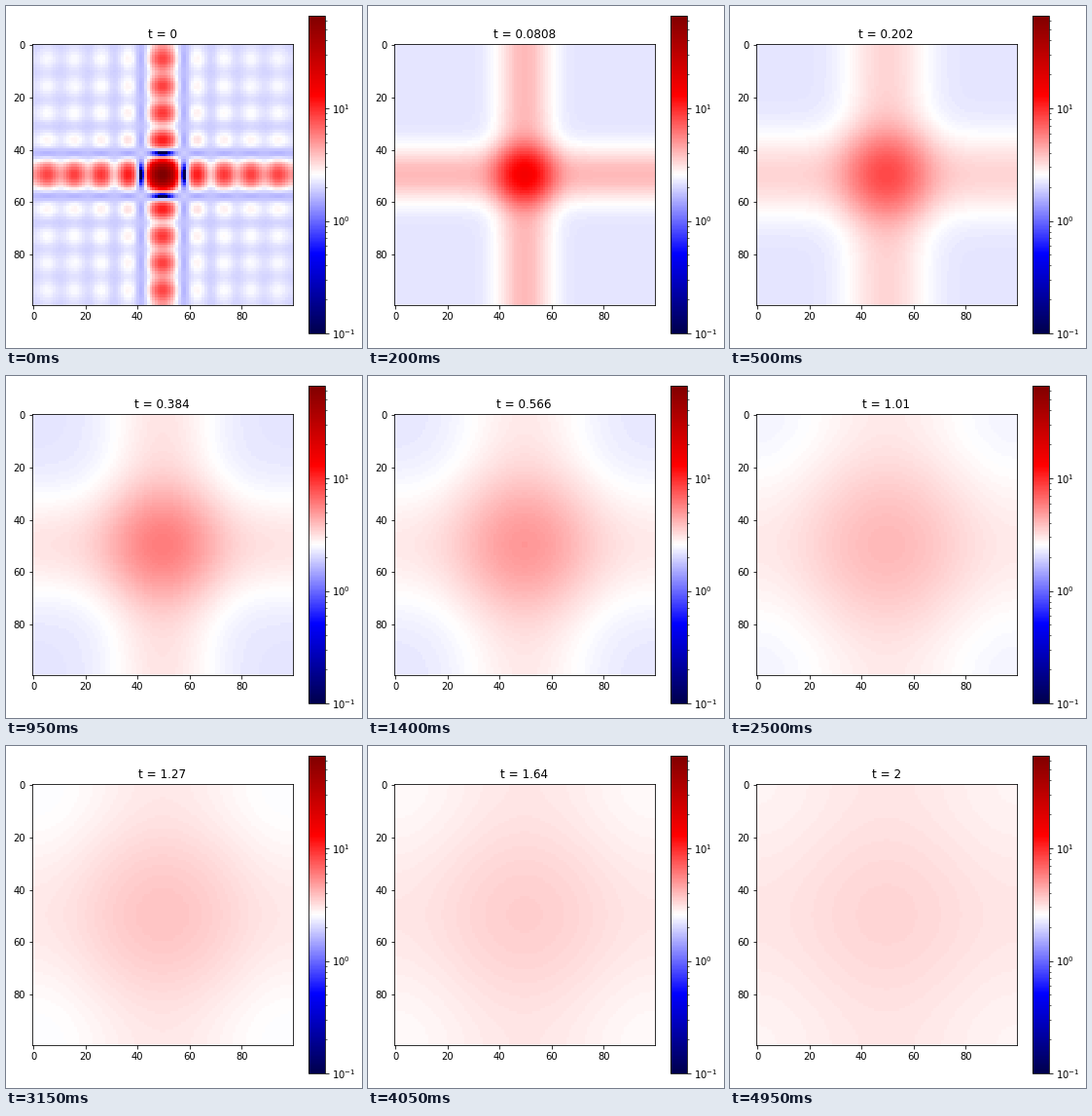
These frames come from a looping animation (366x351 px, 5000 ms). A matplotlib script:

```python
import numpy as np
import matplotlib.pyplot as plt
from matplotlib.animation import FuncAnimation
from matplotlib.colors import LogNorm

W, H, DPI = 366, 351, 72
GRID, MODES, FRAMES = 100, 9, 100
HALF_WIDTH = 0.22                       # half width of the initial box, radians
MEAN, SINGLE, CROSS = 3.05, 1.115, 1.0  # weights of constant, 1-D and 2-D modes
V_MIN, V_MAX = 0.1, 66.5

# Layout in pixels: a square plot centred beside a 20:1 colour bar
LEFT, TOP = 26.8, 9.9
SIDE, BAR_X, BAR_H = 267.84, 284.58, 326.16

x = np.linspace(-np.pi, np.pi, GRID)
n = np.arange(1, MODES + 1)
box = np.sinc(n * HALF_WIDTH / np.pi)
waves = np.cos(np.outer(x, n))
times = np.linspace(0, 2, FRAMES)


def field(t):
    """Truncated cosine series of the heat equation on a square."""
    c = waves @ (box * np.exp(-n**2 * t))
    u = MEAN + SINGLE * (c[:, None] + c) + CROSS * np.outer(c, c)
    return np.clip(u, V_MIN, None)


def add_axes(left, top, width, height):
    return fig.add_axes([left / W, 1 - (top + height) / H, width / W, height / H])


plt.rcParams["font.family"] = "DejaVu Sans"
fig = plt.figure(figsize=(W / DPI, H / DPI), dpi=DPI, facecolor="white")
ax = add_axes(LEFT, TOP + (BAR_H - SIDE) / 2, SIDE, SIDE)
cax = add_axes(LEFT + BAR_X, TOP, BAR_H / 20, BAR_H)

im = ax.imshow(field(0), cmap="seismic", norm=LogNorm(V_MIN, V_MAX),
               interpolation="nearest")
fig.colorbar(im, cax=cax)
title = ax.set_title("t = 0", fontsize=12)


def update(i):
    im.set_data(field(times[i]))
    title.set_text(f"t = {times[i]:.3g}")
    return im, title


anim = FuncAnimation(fig, update, frames=FRAMES, interval=50, repeat=True)
plt.show()
```
